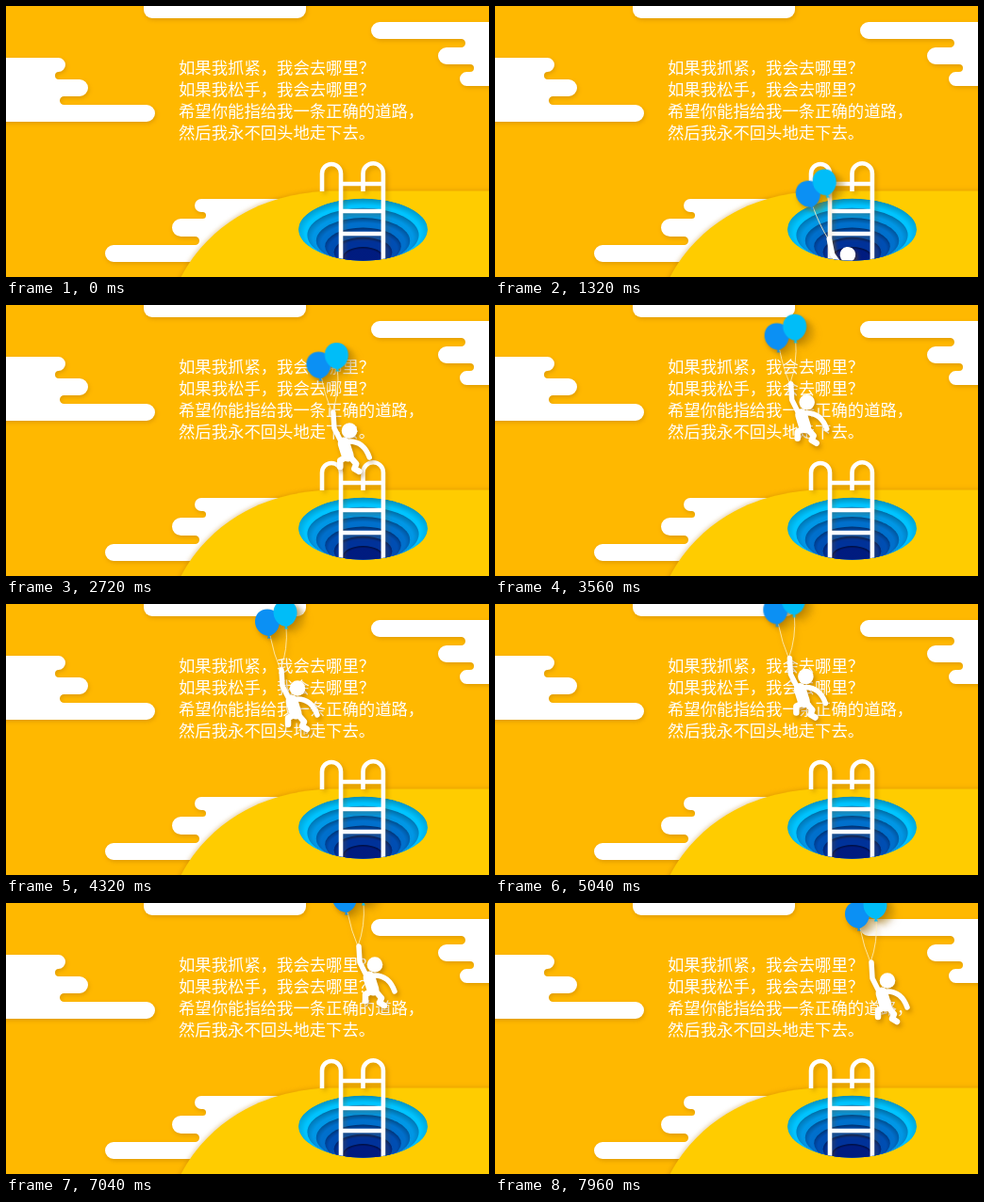
An HTML page for the animation above (8000 ms loop, 512x288 px).

```html
<!DOCTYPE html>
<html lang="zh-CN">
<head>
<meta charset="utf-8">
<style>
  html, body { margin: 0; width: 100%; height: 100%; overflow: hidden; background: #ffb800; }
  svg { display: block; width: 100vw; height: 100vh; }
  #clouds { fill: #fff; filter: drop-shadow(1px 2px 2px #b0700060); }
  .ground { fill: #fc0; filter: drop-shadow(-1px -1px 2px #b0700050); }
  .ladder { fill: none; stroke: #fff; stroke-width: 4.6; filter: drop-shadow(3px 3px 2px #80500040); }
  .flyer { filter: drop-shadow(2px 3px 2.5px #90580080); }
  .balloons { filter: drop-shadow(8px 5px 2px #a0780040); }
  .limb { fill: none; stroke: #fff; stroke-linecap: round; stroke-linejoin: round; }
  text { fill: #fff; font: 300 17.35px "Noto Sans CJK SC", "Noto Sans CJK", sans-serif; }
</style>
</head>
<body>
<svg viewBox="0 0 512 288" preserveAspectRatio="none">
  <defs>
    <clipPath id="hole"><ellipse cx="378.5" cy="237.5" rx="68.5" ry="33"/></clipPath>
    <clipPath id="above"><path d="M0 -20H512V237.5H447A68.5 33 0 0 1 310 237.5H0Z"/></clipPath>
  </defs>
  <rect width="512" height="288" fill="#ffb800"/>
  <g id="clouds"><rect x="146" y="-20" width="172" height="33" rx="9"/></g>
  <path class="ground" d="M185 289C211 239 262 200 342 196.5H520V300H180Z"/>
  <g id="rings" clip-path="url(#hole)"></g>
  <g clip-path="url(#above)">
    <path class="ladder" d="M335 197V178a10 10 0 0 1 20 0V275M378.500 197V178a10.700 10.700 0 0 1 21.400 0V275M355 189H400M355 218H400M355 242H400"/>
  </g>
  <g id="words"></g>

  <g clip-path="url(#above)"><g class="flyer"><g id="flyer" fill="#fff">
    <path d="M-27 -56Q-23 -36-16 -20Q-8 -42-10 -66" fill="none" stroke="#fff3c8" stroke-width=".8"/>
    <g class="balloons">
      <path id="balloon" d="M-30 -84.5c8 0 13 6 13 13.5c0 8-6 14-11 15l2 2.5h-4l1-2.5c-8-1-14-8-14-15c0-8 5-13.5 13-13.5Z" fill="#0b90f4"/>
      <path d="M-11 -94c8 0 12.5 6 12.5 13c0 8-6 14-11 15l1.5 2.5h-4l1-2.5c-7-1-12.5-8-12.5-15c0-7 4.5-13 12.5-13Z" fill="#00bdf8"/>
    </g>
    <circle cx="2" cy="-.5" r="8.3"/>
    <path class="limb" stroke-width="5.5" d="M-15 -20L-14 -3L-7 11M2 11Q17 11 23 28"/>
    <path class="limb" stroke-width="13" d="M-4 13Q-2 20 0 26"/>
    <path class="limb" stroke-width="6.5" d="M-2 28L-8 31L-8 38M3 28L9 35L7 40L12 43"/>
  </g></g></g>
</svg>
<script>
const $ = id => document.getElementById(id);

// rows: [tip, top, bottom, end of the notch below]
function cloud(wall, ...rows) {
  const s = Math.sign(rows[0][0] - wall), out = s > 0 ? 1 : 0;
  const turn = (x, y0, y1, sweep) => {
    const r = (y1 - y0) / 2;
    return `H${x}A${r} ${r} 0 0 ${sweep} ${x} ${y1}`;
  };
  let d = `M${wall} ${rows[0][1]}`;
  rows.forEach(([tip, top, bottom, notch], i) => {
    d += turn(tip - s * (bottom - top) / 2, top, bottom, out);
    const next = rows[i + 1];
    if (next) d += turn(notch + s * (next[1] - bottom) / 2, bottom, next[1], 1 - out);
  });
  return `<path d="${d}H${wall}Z"/>`;
}
$("clouds").innerHTML +=
  cloud(-9, [63, 55, 70, 52], [87, 78, 96, 57], [158, 105, 123]) +
  cloud(521, [387, 17, 35, 487], [458, 44, 62, 496], [481, 70, 85]) +
  cloud(300, [200, 205, 219, 212], [176, 226, 245, 205], [105, 254, 272]);

const lines = ["如果我抓紧，我会去哪里？", "如果我松手，我会去哪里？", "希望你能指给我一条正确的道路，", "然后我永不回头地走下去。"];
$("words").innerHTML = lines.map((s, i) => `<text x="183" y="${72.3 + i * 22.9}">${s}</text>`).join("");

// Each step of the hole is shaded along its rim
let rings = "";
for (let i = 0; i < 6; i++) {
  const ry = 33 - i * 4.3, cy = 204.5 + i * 10.3 + ry;
  const blue = dark => `hsl(${194 + i * 6.6} 100% ${50 - i * 5 - dark}%)`;
  rings += `<radialGradient id="rim${i}" cy=".56" fy=".56" r=".56">
    <stop offset=".8" stop-color="${blue(0)}"/><stop offset="1" stop-color="${blue(14)}"/></radialGradient>
    <ellipse cx="378.5" cy="${cy}" rx="${68.5 - i * 9.4}" ry="${ry}" fill="url(#rim${i})"/>`;
}
$("rings").innerHTML = rings;

// time, x, y
const keys = [
  [360, 374, 360], [1320, 372, 265], [2720, 362, 134], [4320, 307, 90],
  [5720, 357, 70], [7040, 389, 66], [7960, 414, 83]
];

const slope = (i, k) => {
  const a = keys[Math.max(i - 1, 0)], b = keys[Math.min(i + 1, keys.length - 1)];
  return (b[k] - a[k]) / (b[0] - a[0]);
};

function place(t, k) {
  let i = 0;
  while (i < keys.length - 2 && t >= keys[i + 1][0]) i++;
  const a = keys[i], b = keys[i + 1], d = b[0] - a[0], u = (t - a[0]) / d, v = 1 - u;
  return v * v * (1 + 2 * u) * a[k] + u * u * (3 - 2 * u) * b[k] +
    u * v * d * (v * slope(i, k) - u * slope(i + 1, k));
}

const start = performance.now();
function draw(now) {
  const t = Math.floor(Math.max(0, now - start) % 8000 / 40) * 40;
  const tilt = -9 * Math.exp(-(((t - 1500) / 700) ** 2));
  $("flyer").setAttribute("transform", `translate(${place(t, 1)} ${place(t, 2)}) rotate(${tilt})`);
  $("flyer").style.visibility = t < 360 ? "hidden" : "visible";
  requestAnimationFrame(draw);
}
draw(start);
</script>
</body>
</html>
```
